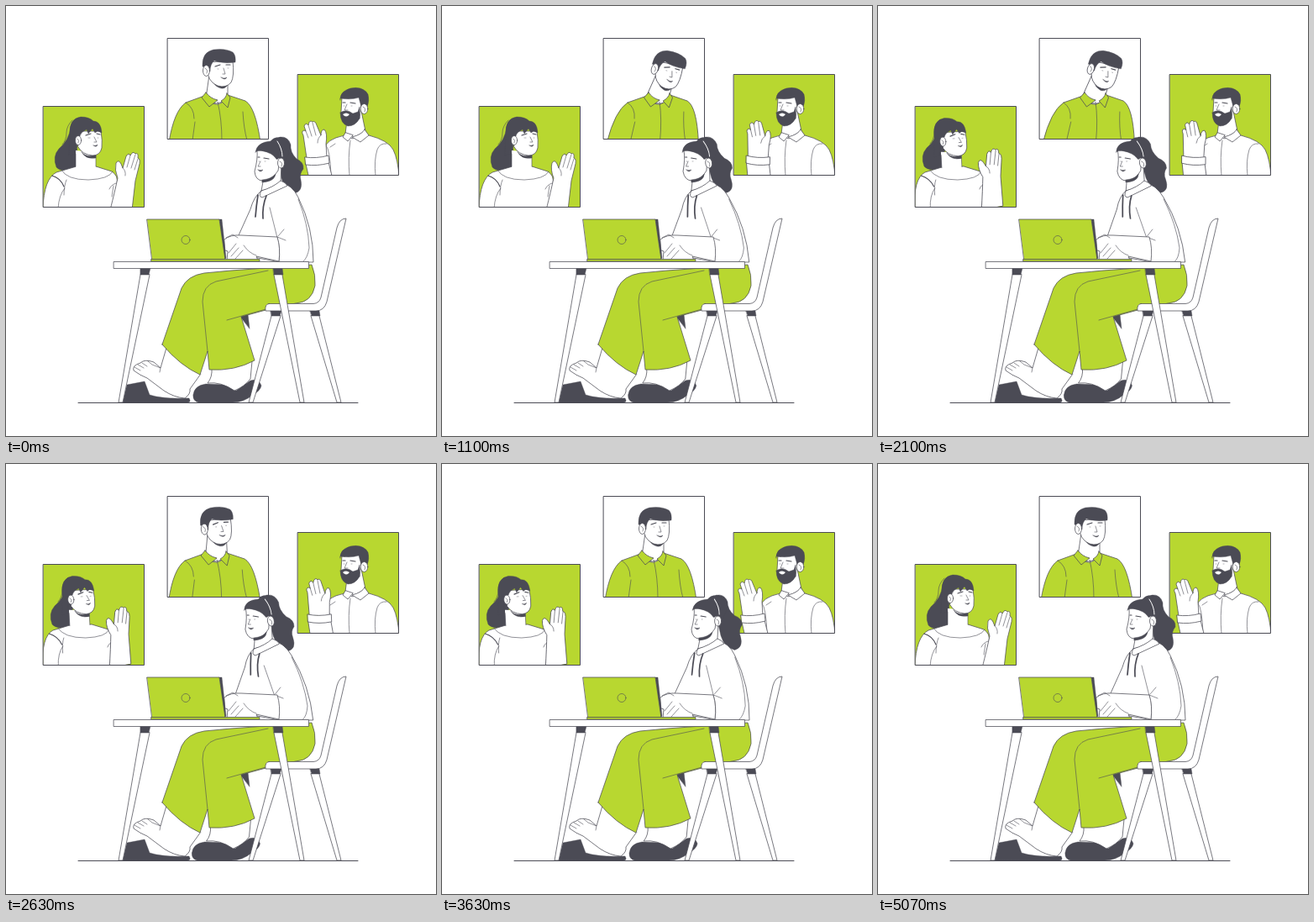
Write an HTML page that moves like this. It is 512x512 px and loops after 5.2 s.

```html
<!DOCTYPE html>
<html lang="en">
<head>
<meta charset="utf-8">
<title>Video call</title>
<style>
html, body { margin: 0; width: 100%; height: 100%; overflow: hidden; background: #fff; }
svg { display: block; width: 100vw; height: 100vh; }
.ink { fill: #4b4b55; stroke: #4b4b55; stroke-width: .4; }
.green { fill: #b8d730; }
.white { fill: #fff; }
.line { fill: none; stroke-width: .6; }
.brow { fill: none; stroke-width: 1.2; }
.thick { fill: none; stroke-width: 1.7; }
.frame { fill: none; stroke-width: 1; }
</style>
</head>
<body>
<svg viewBox="0 0 512 512" stroke="#4b4b55" stroke-width=".75" stroke-linejoin="round" stroke-linecap="round">
  <defs>
    <clipPath id="clipLeft"><path d="M44.5 119.5h120v120h-120z"/></clipPath>
    <clipPath id="clipTop"><path d="M192.5 38.5h120v120h-120z"/></clipPath>
    <clipPath id="clipRight"><path d="M347.5 81.5h120v120h-120z"/></clipPath>
  </defs>

  <!-- Caller on the left -->
  <g clip-path="url(#clipLeft)">
    <path class="green" stroke="none" d="M44 119h121v121H44z"/>
    <g id="leftHair">
      <path class="line" d="M79 136Q72 143 72 151Q72 160 67 165"/>
      <path class="ink" d="M77 144Q75 160 63 170Q55 179 60 192Q66 199 83 194L85 165Z"/>
    </g>
    <g id="leftBody">
      <path class="white" d="M44 241Q45 206 60 198L84 191H107L126 197Q134 202 132 212L126 241Z"/>
      <path class="line" d="M66 195Q72 207 98 207Q123 206 127 197M72 207Q69 214 69 225M62 241Q63 225 70 217M131 211Q125 213 123 218M128 214L126 227"/>
      <path class="brow" d="M55 202Q65 205 69 215"/>
    </g>
    <g id="leftHead">
      <path class="white" stroke="none" d="M83 172V193Q94 197 107 193V174Z"/>
      <path class="line" d="M83 176V191M107 178V191"/>
      <path class="ink" d="M90 174Q96 181 107 177V181Q95 183 90 174Z"/>
      <path class="white" d="M84 149L113 149Q115 160 114 169Q112 178 103 178Q91 177 86 168Z"/>
      <path class="ink" d="M76 152Q75 134 89 132Q99 132 104 137Q113 137 114 151L109 149L106 151L103 146L98 152L96 147Q89 150 88 155L83 157L82 176L75 178Z"/>
      <ellipse class="white" cx="86" cy="160" rx="3.6" ry="5.5"/>
      <path class="line" d="M85 158Q88 160 86 163M105 156L108 162H105"/>
      <path class="brow" d="M95 154L101 152M108 152L112 153"/>
      <path class="ink" d="M98 157h2M109 157h1M104 166Q107 167 109 165Q108 169 104 166Z"/>
    </g>
    <g id="leftArm">
      <path class="white" d="M124 243Q130 219 133 205Q129 195 131 187Q134 182 137 188L139 193L143 179Q146 174 148 178Q151 172 154 176Q158 174 157 181Q161 182 158 192L154 208L150 243Z"/>
      <path class="line" d="M148 178L144 192M154 177L149 193M157 182L153 195M139 193Q143 196 142 202"/>
    </g>
  </g>
  <path class="frame" d="M44.5 119.5h120v120h-120z"/>

  <!-- Caller at the top -->
  <g clip-path="url(#clipTop)">
    <g id="topHead">
      <path class="white" d="M242 82L238 110Q250 122 264 110V90Z"/>
      <path class="ink" d="M247 91Q255 97 264 94Q261 99 256 98Q249 96 247 91Z"/>
      <path class="white" d="M241 67L270 65Q272 84 268 91Q262 98 252 95Q243 91 241 83Z"/>
      <path class="ink" d="M234 72Q233 55 247 52Q261 50 270 55Q274 59 273 67Q257 69 248 65Q243 69 243 78L239 73Z"/>
      <ellipse class="white" cx="238.5" cy="77" rx="4" ry="6.5"/>
      <path class="line" d="M237 74Q241 76 239 80M259 74L261 81H258"/>
      <path class="brow" d="M249 72L255 70M262 70L267 70"/>
      <path class="ink" d="M252 75h1M264 74h1M256 85Q260 87 263 85Q261 89 256 85Z"/>
    </g>
    <g id="topBody">
      <path class="green" d="M194 162Q200 125 214 115L236 107Q248 122 257 115L264 106L285 113Q297 120 303 162Z"/>
      <path class="line" d="M214 115Q224 121 224 134M225 138L222 160M282 126Q283 145 287 160M252 114Q257 135 257 160"/>
      <path class="green" d="M238 103L233 109L242 120L252 112Q243 110 238 103ZM263 104L267 109L264 121L256 113Q262 110 263 104Z"/>
    </g>
  </g>
  <path class="frame" d="M192.5 38.5h120v120h-120z"/>

  <!-- Caller on the right -->
  <g clip-path="url(#clipRight)">
    <path class="green" stroke="none" d="M347 81h121v121H347z"/>
    <path class="white" d="M384 205L380 170Q380 159 403 154L425 147L432 154Q455 160 461 171Q467 183 468 205Z"/>
    <path class="line" d="M381 166Q386 171 387 202M410 160Q407 180 409 202M440 202Q438 184 442 171Q445 163 453 164M386 168L392 164"/>
    <path class="white" d="M406 137L404 152L412 158L428 149L423 125Z"/>
    <path class="white" d="M404 151L401 156L407 161L413 154ZM427 147L432 154L422 162L412 156Q424 153 427 147Z"/>
    <path class="white" d="M400 109L399 126L407 141L421 134L424 108Z"/>
    <path class="ink" d="M398 112Q397 102 410 98Q425 95 431 105Q433 112 430 121L423 120L420 109Q411 112 398 110Z"/>
    <path class="ink" d="M398 127Q405 122 413 128L419 126L421 120V134Q416 143 407 143Q398 140 398 127Z"/>
    <ellipse class="white" cx="426.5" cy="122.5" rx="4.3" ry="6"/>
    <path class="line" d="M425 120Q429 121 427 126M406 117L403 124H407"/>
    <path class="brow" d="M401 115H404M410 115L416 116"/>
    <path class="ink" d="M402 119h1M411 119h1"/>
    <path class="white" stroke="none" d="M401 129Q405 126 409 129Q405 134 401 129Z"/>
    <g id="rightArm">
      <path class="white" d="M357 188L361 206H389L384 186Z"/>
      <path class="white" d="M358 181L354 154Q351 149 355 148L357 149L355 143Q357 138 360 142Q361 135 365 138Q368 136 370 142L375 154Q375 147 379 147Q383 151 381 164L382 181Z"/>
      <path class="line" d="M357 149L360 157M360 142L364 155M365 139L369 154M375 154Q371 157 371 163"/>
      <path class="white" d="M356 180Q369 182 384 178L385 187Q370 191 357 189Z"/>
    </g>
  </g>
  <path class="frame" d="M347.5 81.5h120v120h-120z"/>

  <!-- Chair, legs and feet -->
  <path class="frame" d="M86 472.5H419"/>
  <path class="ink" d="M279 370L288 367L290 384Z"/>
  <path class="ink" d="M139 472L144 451L165 447L171 463Q185 468 218 467Q221 472 216 472Z"/>
  <path class="white" d="M191 407L184 431L176 424Q165 420 160 425Q150 428 152 434Q160 440 168 443L188 458Q200 466 213 467Q220 462 219 456L232 438Z"/>
  <path class="line" d="M153 430L160 434M157 427L164 431M162 425L168 429M169 423L174 427L184 431L183 436"/>
  <g id="frontFoot">
    <path class="ink" d="M223 463Q224 452 238 450L262 451L274 458L291 446Q301 443 304 452Q303 458 294 463Q283 472 270 472H229Q222 470 223 463Z"/>
    <path class="white" d="M245 431Q246 442 240 449Q256 447 272 458Q284 453 291 444L293 423Z"/>
  </g>
  <path class="white" stroke="none" d="M240 411L231 439L242 433Z"/>

  <path class="white" d="M316 369L289 472H294L327 369ZM363 369L394 472H399L373 369Z"/>
  <path class="ink" d="M315 363H328L326 369H316ZM362 363H373L374 369H364Z"/>
  <path class="green" d="M186 403L209 336Q216 321 236 318L268 315L364 308Q369 320 368 333Q364 353 345 354L313 361L280 370L296 422Q272 435 242 433L240 411L231 439Q207 428 186 403Z"/>
  <path class="line" d="M240 411L234 352Q234 333 250 328L312 315M263 374L313 360"/>
  <path class="white" d="M313 354.500H366Q373 354 375 347L394 264Q397 253 405 253L382 352Q379 363 369 363H309Q308 355 313 354.500Z"/>

  <!-- Woman at the desk -->
  <g id="upper">
    <path id="ponytail" class="ink" d="M324 178Q318 159 326 156Q336 155 339 165Q338 174 346 182Q355 186 354 194Q349 200 351 207Q354 221 343 223Q331 219 328 205Z"/>
    <path class="white" d="M304 220Q295 227 291 242L277 273L290 298L326 305H366Q366 264 348 228Q341 213 327 210Z"/>
    <path class="line" d="M348 230Q360 260 361 288Q359 300 354 304M314 240L323 276M323 276Q327 288 325 304M323 275L333 279M331 266L324 274"/>
    <path class="white" d="M307 204L304 220Q318 217 327 210L328 188Z"/>
    <path class="white" d="M299 172Q300 182 296 197Q297 208 306 208Q317 207 324 196L327 176Z"/>
    <path class="ink" d="M305 207Q316 206 321 200Q320 209 305 210Z"/>
    <path class="ink" d="M297 174Q299 162 315 161Q321 154 331 158Q339 164 337 176L332 186L325 181Q322 184 321 181Q317 175 304 172Q299 172 297 174Z"/>
    <ellipse class="white" cx="327.5" cy="187" rx="4" ry="6"/>
    <path class="line" d="M326 185Q330 186 328 191M303 185L300 191H303"/>
    <path class="frame" stroke="#fff" d="M323 161Q329 170 329 179"/>
    <path class="brow" d="M307 181L313 182M300 180H302"/>
    <path class="ink" d="M308 185h1M301 185h1M300 195Q303 196 306 195Q303 199 300 195Z"/>
    <path class="white" d="M304 220Q318 216 327 208Q333 210 335 214Q320 221 305 228Q300 227 304 220Z"/>
    <path class="thick" d="M300 225Q298 238 297 251M310 226Q305 238 306 253"/>
  </g>

  <!-- Hands, laptop and table -->
  <path class="white" d="M260 278Q267 272 280 273L323 275Q327 288 325 304L298 298L300 303H263L264 292L261 291Z"/>
  <path class="line" d="M262 276L270 272L276 276M265 294L274 283M268 298L277 288M273 301L282 291M283 285Q289 294 298 297"/>
  <path class="ink" d="M254 254H257L262 300L260 302Z"/>
  <path class="green" d="M168 254H254L261 302H174Z"/>
  <circle class="line" cx="214" cy="278.5" r="5"/>
  <path class="green" d="M173 301.5H302V304H173Z"/>
  <path class="white" d="M160 320L134 472H139L171 320ZM319 320L350 472H355L329 320Z"/>
  <path class="ink" d="M160 312H172L170 320H160ZM318 312H329L330 320H319Z"/>
  <path class="white" d="M128.5 304.5H360.5V312.5H128.5Z"/>
</svg>
<script>
const LOOP = 5200;

// Each track lists [time, value] pairs joined by smooth easing.
const tracks = {
  lean: [[150, 0], [1470, 1], [2660, 1], [3500, -.1], [4200, 0]],
  hairSwing: [[700, 0], [1500, -4], [2600, -1], [3600, -5], [4200, 0]],
  topShift: [[30, 0], [610, 10], [1070, 8], [2170, 8], [2610, -1], [3150, 0]],
  topTilt: [[30, 0], [610, 20], [1070, 16], [2170, 16], [2610, -3], [3150, 0]],
  leftTurn: [[1090, 0], [1520, 1], [3700, 1], [4200, -.15], [4850, 0]],
  rightWave: [[0, 0], [1300, 1], [1700, 1], [3500, 0]]
};

function sample(keys, t) {
  const next = keys.findIndex(key => key[0] > t);
  if (next === 0) return keys[0][1];
  if (next < 0) return keys[keys.length - 1][1];
  const [t0, a] = keys[next - 1], [t1, b] = keys[next];
  const u = (t - t0) / (t1 - t0);
  return a + (b - a) * u * u * (3 - 2 * u);
}

const place = (id, transform) => document.getElementById(id).setAttribute("transform", transform);
const move = (x, y = 0) => `translate(${x} ${y})`;
const turn = (angle, x, y) => `rotate(${angle} ${x} ${y})`;
// Shifts a point 100 units above the base line sideways by dx.
const shear = (dx, base) => `matrix(1 0 ${-dx / 100} 1 ${dx * base / 100} 0)`;

function draw(t) {
  const pose = {};
  for (const name in tracks) pose[name] = sample(tracks[name], t);
  const { lean, hairSwing, topShift, topTilt, leftTurn, rightWave } = pose;

  place("upper", shear(-10 * lean, 308));
  place("ponytail", turn(hairSwing, 328, 168));
  place("frontFoot", move(-1.5 * lean));

  place("topBody", move(topShift * .35) + shear(topShift * 1.2, 158));
  place("topHead", move(topShift, topShift * .1) + turn(topTilt, 252, 100));

  place("leftBody", shear(-10 * leftTurn, 239));
  place("leftHair", move(-5 * leftTurn, -leftTurn));
  place("leftHead", move(-7 * leftTurn, leftTurn) + turn(-3 * leftTurn, 96, 193));
  place("leftArm", move(-leftTurn, -3 * leftTurn) + turn(-11 * leftTurn, 138, 243));

  place("rightArm", move(4 * rightWave) + turn(8 * rightWave, 372, 200));
}

function tick(now) {
  draw(now % LOOP);
  requestAnimationFrame(tick);
}
draw(0);
requestAnimationFrame(tick);
</script>
</body>
</html>
```
